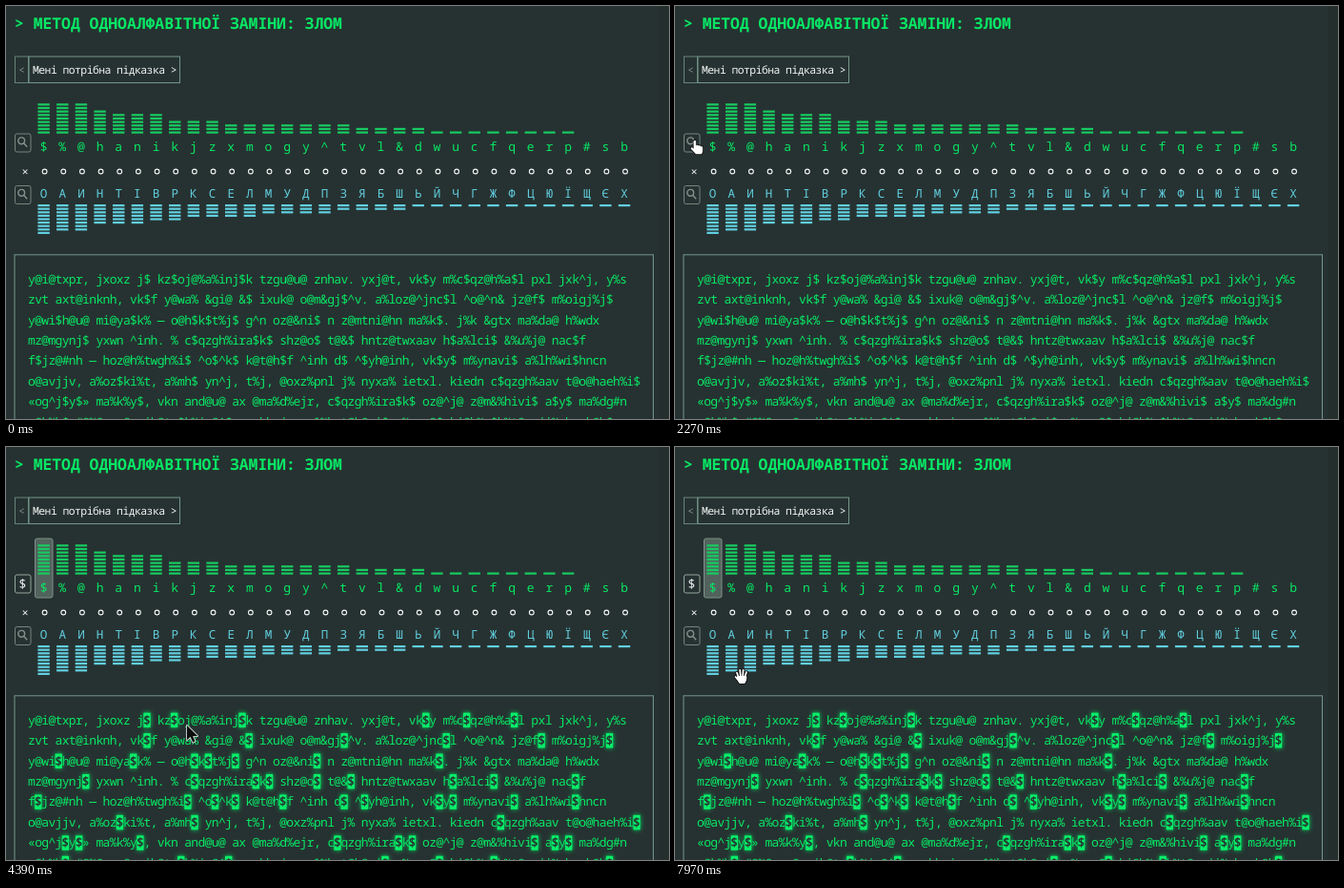
These frames come from a looping animation (696 by 433 pixels, 8 s). An HTML page:

```html
<!DOCTYPE html>
<html lang="uk">
<head>
<meta charset="utf-8">
<style>
  html, body { margin: 0; width: 100%; height: 100%; overflow: hidden; background: #263231; }
  svg { display: block; font-family: "Noto Sans Mono", "DejaVu Sans Mono", monospace; text-rendering: geometricPrecision; }
  #marks { filter: drop-shadow(0 0 2.5px #00d860); }
</style>
</head>
<body>
<svg id="stage" width="696" height="433" viewBox="0 0 696 433"></svg>
<script>
const LOOP = 8000, HOVER_AT = 2800, PICK_AT = 3330;
const BG = '#263231', GREEN = '#08e765', BAR_GREEN = '#17cb61', BLUE = '#62cfe0';
const FRAME = '#75978a', WHITE = '#f4f8f6', GRAY = '#84918c';
const CHAR = 7.14, TEXT_X = 23, LINE = 21.45, TEXT_Y = 290.6, TEXT_SIZE = 13;

const cipher = '$%@hanikjzxmogy^tvl&dwucfqerp#sb';
const cipherBars = '99976664443333333222211111111000';
const plain = 'ОАИНТІВРКСЕЛМУДПЗЯБШЬЙЧГЖФЦЮЇЩЄХ';
const plainBars = '98866655444433332222111111111111';
const lines = [
  'y@i@txpr, jxoxz j$ kz$oj@%a%inj$k tzgu@u@ znhav. yxj@t, vk$y m%c$qz@h%a$l pxl jxk^j, y%s',
  'zvt axt@inknh, vk$f y@wa% &gi@ &$ ixuk@ o@m&gj$^v. a%loz@^jnc$l ^o@^n& jz@f$ m%oigj%j$',
  'y@wi$h@u@ mi@ya$k% — o@h$k$t%j$ g^n oz@&ni$ n z@mtni@hn ma%k$. j%k &gtx ma%da@ h%wdx',
  'mz@mgynj$ yxwn ^inh. % c$qzgh%ira$k$ shz@o$ t@&$ hntz@twxaav h$a%lci$ &%u%j@ nac$f',
  'f$jz@#nh — hoz@h%twgh%i$ ^o$^k$ k@t@h$f ^inh d$ ^$yh@inh, vk$y$ m%ynavi$ a%lh%wi$hncn',
  'o@avjjv, a%oz$ki%t, a%mh$ yn^j, t%j, @oxz%pnl j% nyxa% ietxl. kiedn c$qzgh%aav t@o@haeh%i$',
  '«og^j$y$» ma%k%y$, vkn and@u@ ax @ma%d%ejr, c$qzgh%ira$k$ oz@^j@ z@m&%hivi$ a$y$ ma%dg#n',
  'n@k%h$ #@%@. y@znjk@t $k%jz@^$ n akhxjnz, &%hmt@h@ i$an% az@$xkj@h% $h%t@ynji% hnyk@h$'
];

function add(parent, tag, attrs, content) {
  const node = document.createElementNS('http://www.w3.org/2000/svg', tag);
  for (const key in attrs) node.setAttribute(key, attrs[key]);
  if (content) node.textContent = content;
  parent.append(node);
  return node;
}
const stage = document.getElementById('stage');
const group = () => add(stage, 'g', {});
const box = (parent, x, y, width, height, stroke, rx = 0) =>
  add(parent, 'rect', { x, y, width, height, rx, stroke, fill: 'none' });
const label = (parent, x, y, size, fill, content, extra) =>
  add(parent, 'text', { x, y, 'font-size': size, fill, ...extra }, content);
const centred = { 'text-anchor': 'middle' };
const spacing = (advance, size) => ({ 'letter-spacing': advance - size * 0.6 });

// Page edge, heading and buttons
add(stage, 'rect', { x: 686, y: 0, width: 10, height: 433, fill: '#232e2d' });
label(stage, 9, 24, 16.4, GREEN, '> МЕТОД ОДНОАЛФАВІТНОЇ ЗАМІНИ: ЗЛОМ', { 'font-weight': 700, ...spacing(9.83, 16.4) });
box(stage, 9.5, 53, 14, 27.5, '#68847a');
label(stage, 16.5, 70.5, 11, GRAY, '<', centred);
box(stage, 24, 53, 158.5, 27.5, FRAME);
label(stage, 28, 70.5, 11.4, WHITE, 'Мені потрібна підказка >', { 'font-weight': 500, ...spacing(6.3, 11.4) });

// Frequency columns
const columnBox = box(stage, 30.5, 96, 18.5, 62, '#7f8f88', 2);
[...cipher].forEach((char, i) => {
  const x = 39.6 + i * 19.66;
  const bar = (y, fill) => add(stage, 'rect', { x: x - 6.2, y, width: 12.4, height: 2.2, fill });
  for (let n = 0; n < cipherBars[i]; n++) bar(131.5 - n * 3.66, BAR_GREEN);
  for (let n = 0; n < plainBars[i]; n++) bar(208 + n * 3.6, BLUE);
  label(stage, x, 151.5, 13, GREEN, char, centred);
  label(stage, x, 201, 12.6, BLUE, plain[i], centred);
  add(stage, 'circle', { cx: x + 1, cy: 173.5, r: 2.4, fill: 'none', stroke: WHITE, 'stroke-width': 1.1 });
});
label(stage, 20, 178, 12, WHITE, '×', centred);

// Search boxes
function magnifier(top) {
  const icon = group();
  box(icon, 9.5, top, 16.5, 19, '#75857e', 2);
  add(icon, 'path', {
    d: `M19.6 ${top + 7.3}a3.4 3.4 0 1 0-6.8 0a3.4 3.4 0 1 0 6.8 0M18.6 ${top + 9.8}l3.6 4`,
    fill: 'none', stroke: GRAY, 'stroke-width': 1.4
  });
  return icon;
}
const emptySearch = magnifier(134);
magnifier(188.5);
const filledSearch = group();
box(filledSearch, 9.5, 134, 16.5, 19, '#93a69d', 2);
label(filledSearch, 17.5, 148.3, 13, WHITE, '$', centred);

// Encrypted text and the marks on the picked character
box(stage, 9, 260.8, 670.5, 200, FRAME);
lines.forEach((line, row) =>
  label(stage, TEXT_X, TEXT_Y + row * LINE, TEXT_SIZE, GREEN, line, spacing(CHAR, TEXT_SIZE)));
const marks = add(stage, 'g', { id: 'marks' });
const markChars = group();
lines.forEach((line, row) => [...line].forEach((char, i) => {
  if (char !== '$') return;
  const x = TEXT_X + i * CHAR, y = TEXT_Y + row * LINE;
  add(marks, 'rect', { x, y: y - 12, width: CHAR + 0.2, height: 15.5, fill: '#08ee69' });
  label(markChars, x + CHAR / 2, y, TEXT_SIZE, BG, '$', { ...centred, 'font-weight': 600 });
}));

// Cursors, drawn around their hot spots
function cursor(d, fill, outline, lineWidth) {
  const node = group();
  const shape = { d, fill, 'stroke-linejoin': 'round', 'stroke-linecap': 'round' };
  add(node, 'path', { ...shape, stroke: outline, 'stroke-width': lineWidth + 1.8 });
  add(node, 'path', { ...shape, stroke: fill, 'stroke-width': lineWidth });
  return node;
}
const cursors = {
  point: cursor('M-1 1Q0-.2 1 1V6Q3 4.8 4 6.2Q5.4 5.4 6.3 6.8Q8 6.4 8 8V11Q8 13 7 14.4H1Q-1 12-3.8 9.2Q-4.2 7.8-3 8L-1 9.4Z', '#fff', '#111', 0.5),
  arrow: cursor('M0 0V15L3.6 11.8L6.2 17.5L8.4 16.5L6 11H11Z', '#0c0f0e', '#d8dfdc', 0.2),
  beam: cursor('M-2.5-6.5H2.5M0-6.5V6.5M-2.5 6.5H2.5', '#fff', '#111', 1.2),
  grab: cursor('M-3.6 1L-5-3.4M-1.2 0L-1.8-6M1.2 0L1.6-6M3.4 1L5-4M-4 4L-6.4 1M-4 1H4.4L4.2 4Q3.2 6.5 2.8 7H-2Q-3.8 5-4 3Z', '#fff', '#111', 1.8)
};

// time, x, y, cursor shown from then on
const path = [
  [100, 150, -16, 'arrow'], [520, 120, 62, 'point'], [940, 100, 68, 'point'],
  [1020, 78, 90, 'arrow'], [1230, 29, 138, 'point'], [1500, 27, 138, 'point'],
  [1900, 19, 140, 'point'], [2550, 22, 141, 'point'], [2850, 40, 122, 'point'],
  [3480, 41, 122, 'point'], [3620, 62, 165, 'arrow'], [4150, 180, 285, 'arrow'],
  [4390, 190, 292, 'arrow'], [4430, 180, 294, 'beam'], [4650, 84, 335, 'beam'],
  [5120, 430, 287, 'beam'], [5450, 439, 288, 'beam'], [5600, 430, 292, 'beam'],
  [6050, 335, 350, 'beam'], [6500, 120, 255, 'arrow'], [6600, 75, 225, 'grab'],
  [6840, 49, 208.5, 'grab'], [7100, 48, 210, 'grab'], [7350, 24, 193, 'point'],
  [7740, 20, 193, 'point'], [7810, 36, 205, 'grab'], [7960, 70, 240, 'grab'], [8000, 70, 240, 'grab']
];

const show = (node, on) => node.setAttribute('visibility', on ? 'visible' : 'hidden');

function render(t) {
  const hovered = t >= HOVER_AT, picked = t >= PICK_AT;
  show(emptySearch, !hovered);
  show(filledSearch, hovered);
  show(columnBox, hovered);
  columnBox.setAttribute('fill', picked ? '#52635d' : 'none');
  show(marks, picked);
  show(markChars, picked);

  const step = path.findLastIndex(key => key[0] <= t);
  for (const kind in cursors) show(cursors[kind], step >= 0 && path[step][3] === kind);
  if (step < 0) return;
  const [t0, x0, y0, kind] = path[step];
  const [t1, x1, y1] = path[step + 1];
  const p = (t - t0) / (t1 - t0), eased = p * p * (3 - 2 * p);
  cursors[kind].setAttribute('transform', `translate(${x0 + (x1 - x0) * eased} ${y0 + (y1 - y0) * eased})`);
}

const start = performance.now();
function tick() {
  render((performance.now() - start) % LOOP);
  requestAnimationFrame(tick);
}
tick();
</script>
</body>
</html>
```
